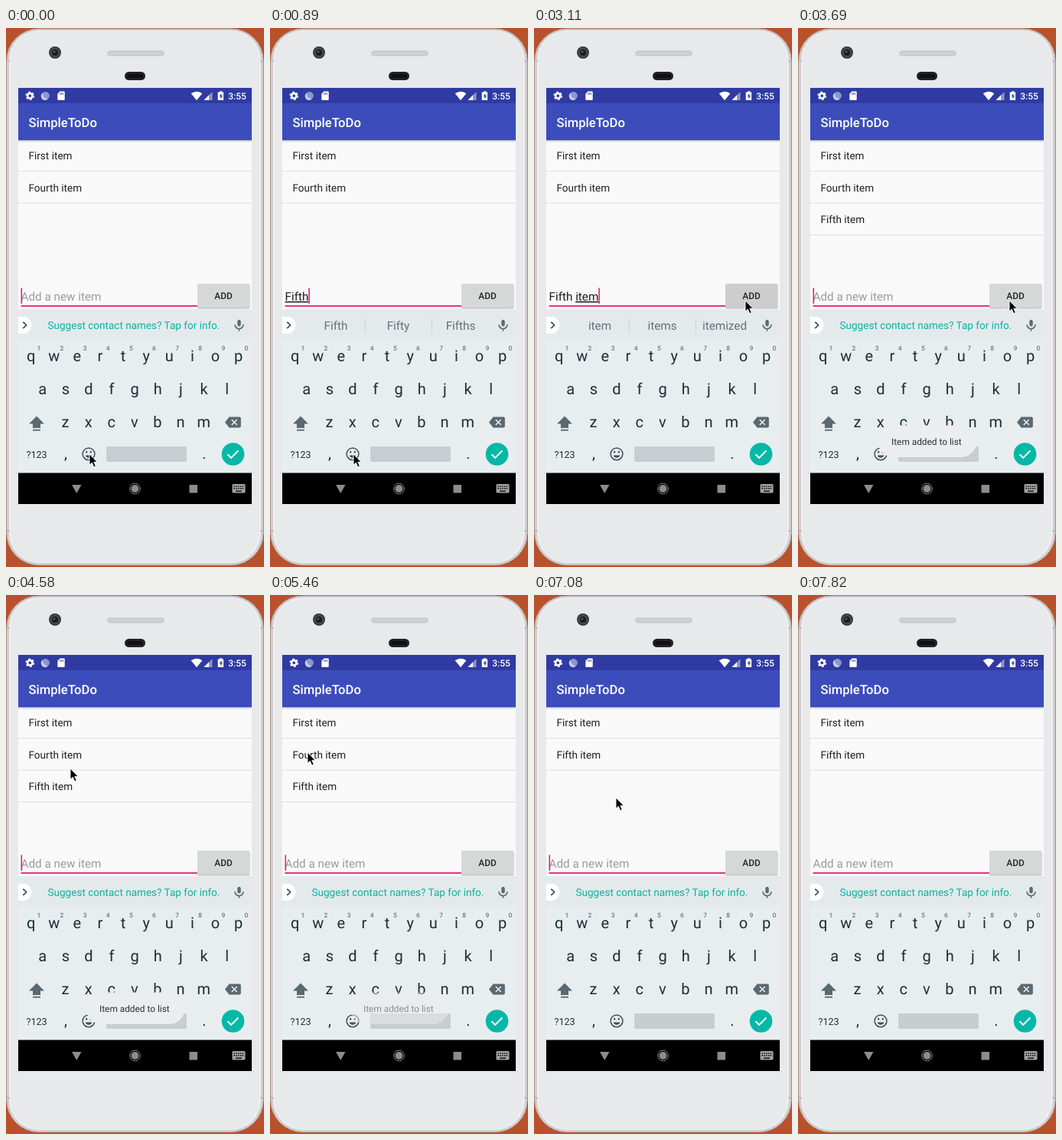
These frames come from a looping animation (337 px wide and 702 px high, 8000 ms). An HTML page:

```html
<!DOCTYPE html>
<html lang="en">
<head>
<meta charset="utf-8">
<title>SimpleToDo</title>
<style>
html, body { margin: 0; width: 100%; height: 100%; overflow: hidden; background: #b9522c; }
svg { display: block; width: 337px; height: 702px; }
text { font-family: Roboto, Arial, sans-serif; white-space: pre; text-rendering: geometricPrecision; }
.mid { text-anchor: middle; }
.item { font-size: 13.55px; fill: #1f1f1f; }
.field { font-size: 15.25px; fill: #1f1f1f; }
.key { font-size: 20px; fill: #1f2d36; }
.digit { font-size: 8.5px; font-weight: 500; fill: #6b7880; }
.word { font-size: 15.25px; fill: #64717a; }
</style>
</head>
<body>
<svg viewBox="0 0 337 702">
  <!-- phone body -->
  <rect width="337" height="702" fill="#b9522c"/>
  <rect x=".8" y="1" width="335.4" height="698.5" rx="42" fill="#d6d2d4" stroke="#b0a5a7"/>
  <rect x="3.5" y="2.5" width="330" height="695" rx="40" fill="#f1f0f1" stroke="#c4bfc2" stroke-width=".8"/>
  <rect x="6" y="4" width="325" height="692" rx="38" fill="#e7e9eb"/>
  <path d="M0 43h5M332 43h5M0 655h5M332 655h5" stroke="#a79fa2"/>
  <circle cx="64" cy="32" r="8" fill="#3a3a3e"/>
  <circle cx="64" cy="32" r="5" fill="#1c1c20" stroke="#66666b"/>
  <circle cx="63" cy="31" r="1.5" fill="#5b5f6b"/>
  <rect x="132.5" y="30" width="74" height="6" rx="3" fill="#cfd0d1" stroke="#bbbcbe" stroke-width=".8"/>
  <rect x="155" y="57" width="27" height="11" rx="5.5" fill="#222226"/>
  <rect x="158" y="60" width="21" height="5" rx="2.5" fill="#101013"/>

  <!-- status and app bar -->
  <rect x="16" y="78" width="305" height="302" fill="#f9f9f9"/>
  <rect x="16" y="146" width="305" height="1.2" fill="#b9bac6"/>
  <rect x="16" y="147" width="305" height="1.5" fill="#e4e4e8"/>
  <rect x="16" y="78" width="305" height="20" fill="#2f3ba2"/>
  <rect x="16" y="98" width="305" height="48" fill="#3c4dbb"/>
  <g fill="#fff">
    <circle cx="31.3" cy="88.3" r="3.2" fill="none" stroke="#fff" stroke-width="2.6"/>
    <circle cx="31.3" cy="88.3" r="5" fill="none" stroke="#fff" stroke-width="1.6" stroke-dasharray="2.6 2.636"/>
    <circle cx="51.5" cy="88.3" r="5.4" fill="#8f94d0"/>
    <path d="M47.6 84.5a5.4 5.4 0 0 0 7 8.3q-6-1.300-7-8.300z" fill="#c9cbea"/>
    <path d="M70.500 82.500h5.200q1 0 1 1v9.400q0 1-1 1h-7.400q-1 0-1-1v-7.200z"/>
    <path d="M70.700 84.500v2.200M72.500 84.500v2.200M74.300 84.500v2.200" stroke="#2f3ba2"/>
    <path d="M241.700 85.300q7.300-5 14.600 0L249 94.200z"/>
    <path d="M258.500 94L269.500 83V94z" fill="#8d93cd"/>
    <path d="M258.500 94L265 87.500V94z"/>
    <path d="M279.300 82.300h2.800v1.200h2v10.600h-7.400V83.500h2.600z"/>
    <path d="M281.400 85l-2.700 4.300h1.700v3.300l2.600-4.400h-1.600z" fill="#2f3ba2"/>
    <text x="290.300" y="92.600" font-size="12" font-weight="500">3:55</text>
    <text x="29.500" y="128.500" font-size="16.600" font-weight="500">SimpleToDo</text>
  </g>

  <!-- list and entry field -->
  <g id="rows"></g>
  <rect x="19.500" y="361.200" width="230.500" height="1.800" fill="#e0246c"/>
  <text id="hint" class="field" x="19.500" y="355" style="fill:#9c9c9c">Add a new item</text>
  <text id="entry" class="field" x="19.500" y="355"><tspan></tspan><tspan text-decoration="underline"></tspan></text>
  <rect id="caret" y="338.500" width="1.600" height="20.500" fill="#e0246c"/>
  <rect x="250" y="334" width="68.500" height="31.500" rx="2" fill="#bcbdbd"/>
  <rect id="button" x="250" y="333" width="68" height="31.300" rx="2"/>
  <text class="mid" x="284" y="353" font-size="11.860" font-weight="500" fill="#222">ADD</text>

  <!-- keyboard -->
  <rect x="16" y="366.500" width="305" height="213" fill="#e8edf0"/>
  <rect x="16" y="366.500" width="305" height="38" fill="#e4e9ec"/>
  <path d="M16 376h6.500a11 11 0 0 1 0 22H16z" fill="#fff"/>
  <path d="M22.300 382.800l4.300 4.200-4.300 4.200" fill="none" stroke="#37474f" stroke-width="1.700"/>
  <text id="notice" x="54.500" y="392" font-size="13.550" fill="#0bb3a2">Suggest contact names? Tap for info.</text>
  <g id="words">
    <path d="M124.500 377.500v20M211.500 377.500v20" stroke="#cdd3d7"/>
    <text class="word mid" x="86" y="393"></text>
    <text class="word mid" x="167.500" y="393"></text>
    <text class="word mid" x="249" y="393"></text>
  </g>
  <g fill="none" stroke="#5c6a72" stroke-width="1.600">
    <rect x="302.300" y="380" width="4.400" height="8.600" rx="2.200" fill="#5c6a72" stroke="none"/>
    <path d="M299 386.300a5.500 5.500 0 0 0 11 0M304.500 391.800v3"/>
  </g>
  <g id="keys"></g>
  <g fill="#5a6870">
    <path d="M40 505.500l10 10h-5v5.500h-10v-5.500h-5z"/>
    <rect x="35" y="522.800" width="10" height="1.800"/>
    <path d="M286 513.500l5.500-7h13.500q1.800 0 1.800 1.800v10.400q0 1.800-1.800 1.800h-13.500z"/>
  </g>
  <path d="M294.800 510l7 7m0-7l-7 7" stroke="#e8edf0" stroke-width="1.600"/>
  <g fill="none" stroke="#42525b" stroke-width="1.500">
    <circle cx="108" cy="554.800" r="7.900"/>
    <path d="M103.700 556.500a4.500 4.500 0 0 0 8.600 0z" fill="#42525b" stroke="none"/>
    <path d="M105.200 551v2.600M110.800 551v2.600" stroke-width="2"/>
  </g>
  <rect x="131" y="545" width="105" height="20" rx="2" fill="#c8cdd1"/>
  <circle cx="296.500" cy="555" r="14.800" fill="#04b8a7"/>
  <path d="M289.500 555.300l4.600 4.600 9.300-9.400" fill="none" stroke="#fff" stroke-width="2"/>

  <!-- navigation bar -->
  <rect x="16" y="579.500" width="305" height="40.500"/>
  <g fill="#8c8c8c">
    <path d="M86 595h12.500l-6.250 11z"/>
    <circle cx="168.500" cy="600" r="5"/>
    <circle cx="168.500" cy="600" r="6.800" fill="none" stroke="#8c8c8c"/>
    <rect x="239.500" y="595" width="10.500" height="10.500"/>
    <rect x="295.500" y="594" width="17" height="11.500" rx="1.500" fill="#a5a5a5"/>
    <path d="M297.500 597h13M297.500 599.800h13" stroke="#000" stroke-width="1.500" stroke-dasharray="1.500 1.300"/>
    <path d="M300 603.200h8" stroke="#000" stroke-width="1.300"/>
  </g>

  <g id="toast">
    <rect x="104.500" y="517.500" width="129" height="41.500" rx="20.700" fill="#ebedee"/>
    <text x="122" y="543" font-size="11.860" fill="#303030">Item added to list</text>
  </g>
  <path id="pointer" d="M0 0v14.200l3.300-3 2.400 5.600 2.500-1.100-2.400-5.400h4.400z" stroke="#fff" stroke-width=".9"/>
</svg>
<script>
const LOOP = 8000;
const $ = id => document.getElementById(id);

function addText(parent, cls, x, y, str) {
  const el = document.createElementNS('http://www.w3.org/2000/svg', 'text');
  el.setAttribute('class', cls);
  el.setAttribute('x', x);
  el.setAttribute('y', y);
  el.textContent = str;
  parent.append(el);
  return el;
}

// Keys
const PITCH = 30.12;
[['qwertyuiop', 32.6, 434], ['asdfghjkl', 47.7, 477], ['zxcvbnm', 77.5, 520]].forEach(([row, x, y], r) => {
  [...row].forEach((ch, i) => {
    const cx = x + i * PITCH;
    addText($('keys'), 'key mid', cx, y, ch);
    if (!r) addText($('keys'), 'digit mid', cx + 10.3, 419.5, (i + 1) % 10);
  });
});
addText($('keys'), 'key mid', 40, 559.5, '?123').style.fontSize = '12.5px';
addText($('keys'), 'key mid', 78, 561, ',');
addText($('keys'), 'key mid', 259, 561, '.');

// Each timeline holds its value until the next entry: [ms, value]
const rows = [
  [0, ['First item', 'Fourth item']],
  [3260, ['First item', 'Fourth item', 'Fifth item']],
  [6200, ['First item', 'Fifth item']]
];
// value: settled text, word being composed
const entry = [
  [0, ['', '']], [150, ['', 'F']], [450, ['', 'Fif']], [740, ['', 'Fift']], [890, ['', 'Fifth']],
  [1190, ['Fifth ', '']], [1340, ['Fifth ', 'i']], [1490, ['Fifth ', 'it']],
  [1630, ['Fifth ', 'ite']], [1780, ['Fifth ', 'item']], [3260, ['', '']]
];
const words = [
  [0, ''], [740, 'Fift Fifth Fifty'], [890, 'Fifth Fifty Fifths'], [1190, 'of and in'],
  [1340, 'i in is'], [1490, 'it its item'], [1630, 'ite it items'],
  [1780, 'item items itemized'], [3410, '']
];
const caret = [
  [0, 1], [2230, 0], [2670, 1], [3700, 0], [4140, 1], [4730, 0], [5170, 1],
  [5600, 0], [6200, 1], [6640, 0], [7080, 1], [7670, 0]
];
const pressed = [[0, 0], [3110, 1], [3410, 0]];
const toast = [[0, 0], [3260, .4], [3410, 1], [5310, .8], [5460, .5], [5600, .2], [5750, 0]];
const pointer = [
  [0, [109, 555]], [2080, [116, 547]], [2230, [160, 505]], [2380, [222, 442]],
  [2520, [282, 378]], [2670, [276, 355]], [3850, [266, 338]], [3990, [228, 302]],
  [4140, [174, 264]], [4440, [126, 243]], [4580, [84, 226]], [4730, [60, 212]],
  [4870, [49, 205]], [6940, [64, 222]], [7080, [107, 264]], [7230, [148, 318]],
  [7370, [180, 366]], [7670, [271, 653]], [7820, null]
];

const at = (line, t) => line.findLast(e => e[0] <= t)[1];
const show = (el, on) => { el.style.visibility = on ? 'visible' : 'hidden'; };

let shownRows;
function drawRows(list) {
  if (list === shownRows) return;
  shownRows = list;
  $('rows').replaceChildren();
  list.forEach((name, i) => {
    addText($('rows'), 'item', 29.5, 171.3 + i * 41.5, name);
    const rule = document.createElementNS('http://www.w3.org/2000/svg', 'rect');
    const box = { x: 16, y: 186 + i * 41.5, width: 305, height: 1, fill: '#dfdfdf' };
    for (const k in box) rule.setAttribute(k, box[k]);
    $('rows').append(rule);
  });
}

const [settled, composing] = $('entry').children;
const slots = $('words').querySelectorAll('text');

function draw(t) {
  drawRows(at(rows, t));

  const [before, word] = at(entry, t);
  settled.textContent = before;
  composing.textContent = word;
  const full = before + word;
  show($('hint'), !full);
  $('caret').setAttribute('x', 19.5 + (full ? $('entry').getComputedTextLength() : 0));
  show($('caret'), at(caret, t));

  const picks = at(words, t);
  show($('notice'), !picks);
  show($('words'), picks);
  slots.forEach((slot, i) => { slot.textContent = picks.split(' ')[i] || ''; });

  $('button').setAttribute('fill', at(pressed, t) ? '#cdcdcd' : '#d6d7d7');
  $('toast').style.opacity = at(toast, t);

  const pos = at(pointer, t);
  show($('pointer'), pos);
  if (pos) $('pointer').setAttribute('transform', `translate(${pos})`);
}

const start = performance.now();
function tick() {
  draw((performance.now() - start) % LOOP);
  requestAnimationFrame(tick);
}
tick();
</script>
</body>
</html>
```
